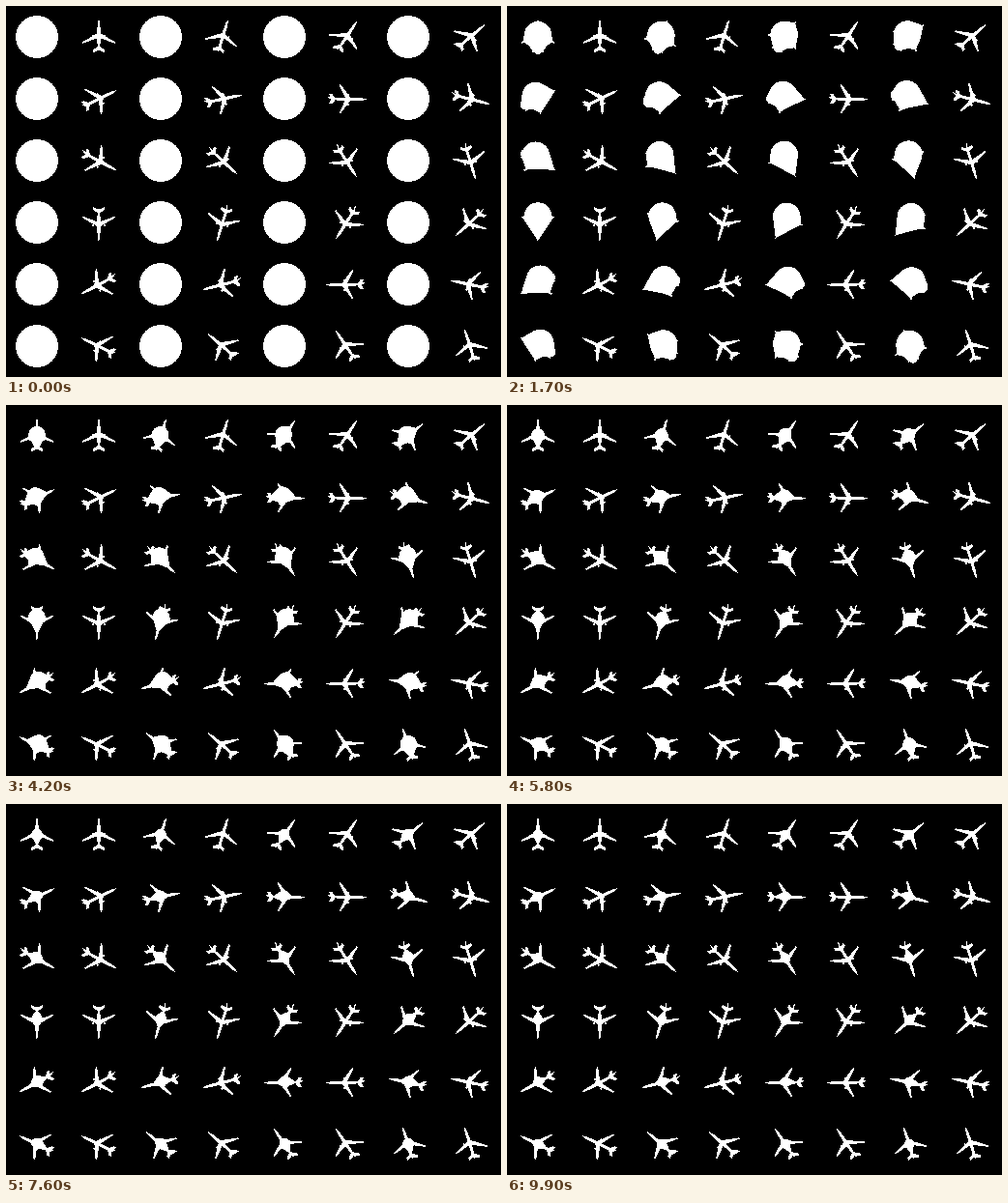
An HTML page that plays this animation: 512 px wide and 384 px high, repeating every 10000 ms.

```html
<!DOCTYPE html>
<html>
<head>
<meta charset="utf-8">
<style>
html, body { margin: 0; width: 100%; height: 100%; overflow: hidden; background: #000; }
svg { display: block; }
path { fill: #fff; shape-rendering: crispEdges; }
</style>
</head>
<body>
<svg id="stage" width="512" height="384" viewBox="0 0 512 384"></svg>
<script>
const LOOP = 10000, STEP = 100, CELL = 64, COLUMNS = 4, VIEWS = 24;
const SIN_ELEV = 0.88, COS_ELEV = Math.sqrt(1 - SIN_ELEV ** 2);
const stage = document.getElementById('stage');

const ball = (x, y, z, r) => ({ x, y, z, r });
const mirror = part => part.map(b => ({ ...b, y: -b.y }));
const withMirror = part => [part, mirror(part)];
const series = (count, make) => Array.from({ length: count }, (_, i) => make(i));

// Every part of the plane is the hull of a few balls.
function fuselage(nose, length, radius) {
  return series(9, i => {
    const t = i / 8;
    const r = 0.4 + radius * Math.sin(Math.PI * t) ** 0.4;
    return ball(nose - length * t, 0, 1.5 * (t - 1), r);
  });
}

function fin({ lead, chord, tipChord, sweep, span = 0, rise = 0 }) {
  return series(4, i => {
    const t = i >> 1, edge = i & 1;
    const x = lead - sweep * t - edge * (t ? tipChord : chord);
    return ball(x, span * t, rise * t - 0.5, 0.4);
  });
}

const wing = fin({ lead: 5, chord: 5, tipChord: 1, sweep: 11, span: 16.5 });
const tailplane = fin({ lead: -11, chord: 4, tipChord: 2.5, sweep: 4, span: 5.5 });
const rudder = fin({ lead: -12, chord: 4, tipChord: 1.5, sweep: 5.5, rise: 4.5 });
const engine = [ball(2, 6, -2, 1.2)];
const frame = [fuselage(20.8, 37.5, 1.3), rudder, ...withMirror(wing), ...withMirror(tailplane)];
const plane = [...frame, ...withMirror(engine)];

function project({ x, y, z, r }, angle) {
  const s = Math.sin(angle), c = Math.cos(angle);
  return { x: x * s + y * c, y: -(x * c - y * s) * SIN_ELEV - z * COS_ELEV, r };
}

function outline({ x, y, r }) {
  const count = r > 3 ? 48 : 10;
  return series(count, i => {
    const a = i / count * 2 * Math.PI;
    return { x: x + r * Math.cos(a), y: y + r * Math.sin(a) };
  });
}

function hull(points) {
  const turn = (a, b, p) => (b.x - a.x) * (p.y - a.y) - (b.y - a.y) * (p.x - a.x);
  const half = list => {
    const out = [];
    for (const p of list) {
      while (out.length > 1 && turn(out[out.length - 2], out[out.length - 1], p) <= 0) out.pop();
      out.push(p);
    }
    return out.slice(0, -1);
  };
  points.sort((a, b) => a.x - b.x || a.y - b.y);
  return [...half(points), ...half([...points].reverse())];
}

function silhouette(parts, angle) {
  return parts.map(part => {
    const points = part.flatMap(b => outline(project(b, angle)));
    return 'M' + hull(points).map(p => p.x.toFixed(2) + ' ' + p.y.toFixed(2)).join('L') + 'Z';
  }).join('');
}

// A ball that shrinks onto the plane, webbed out towards nose, wing tips and tail.
function carved(step) {
  const decay = span => Math.exp(-step / span);
  const lift = 1.2 * step * decay(20);
  const core = ball(-0.3 * lift, 0, lift, 4.5 + 17.5 * decay(29));
  if (!step) return [[core]];
  const reach = Math.min(1, 0.2 + 1.1 * decay(40));
  const nose = [core, ball(20 * reach, 0, -1, 1.2)];
  const side = [core, ball(-6 * reach, 16 * reach, -0.5, 0.5)];
  const tail = [core, ball(-16 * Math.sqrt(reach), 0, 0, 1.2 + 6 * decay(30))];
  return [[core], nose, tail, ...withMirror(side), ...frame];
}

function addPath(x, y) {
  const path = document.createElementNS('http://www.w3.org/2000/svg', 'path');
  path.setAttribute('transform', `translate(${x} ${y})`);
  stage.appendChild(path);
  return path;
}

const views = series(VIEWS, i => {
  const angle = i * 2 * Math.PI / VIEWS;
  const x = (i % COLUMNS * 2 + 0.5) * CELL;
  const y = (Math.floor(i / COLUMNS) + 0.5) * CELL;
  addPath(x + CELL, y).setAttribute('d', silhouette(plane, angle));
  return { angle, path: addPath(x, y) };
});

let shown = -1;
function draw(time) {
  const step = Math.floor(time % LOOP / STEP);
  if (step === shown) return;
  shown = step;
  const parts = carved(step);
  for (const { angle, path } of views) path.setAttribute('d', silhouette(parts, angle));
}

const start = performance.now();
function tick() {
  draw(performance.now() - start);
  requestAnimationFrame(tick);
}
draw(0);
requestAnimationFrame(tick);
</script>
</body>
</html>
```
